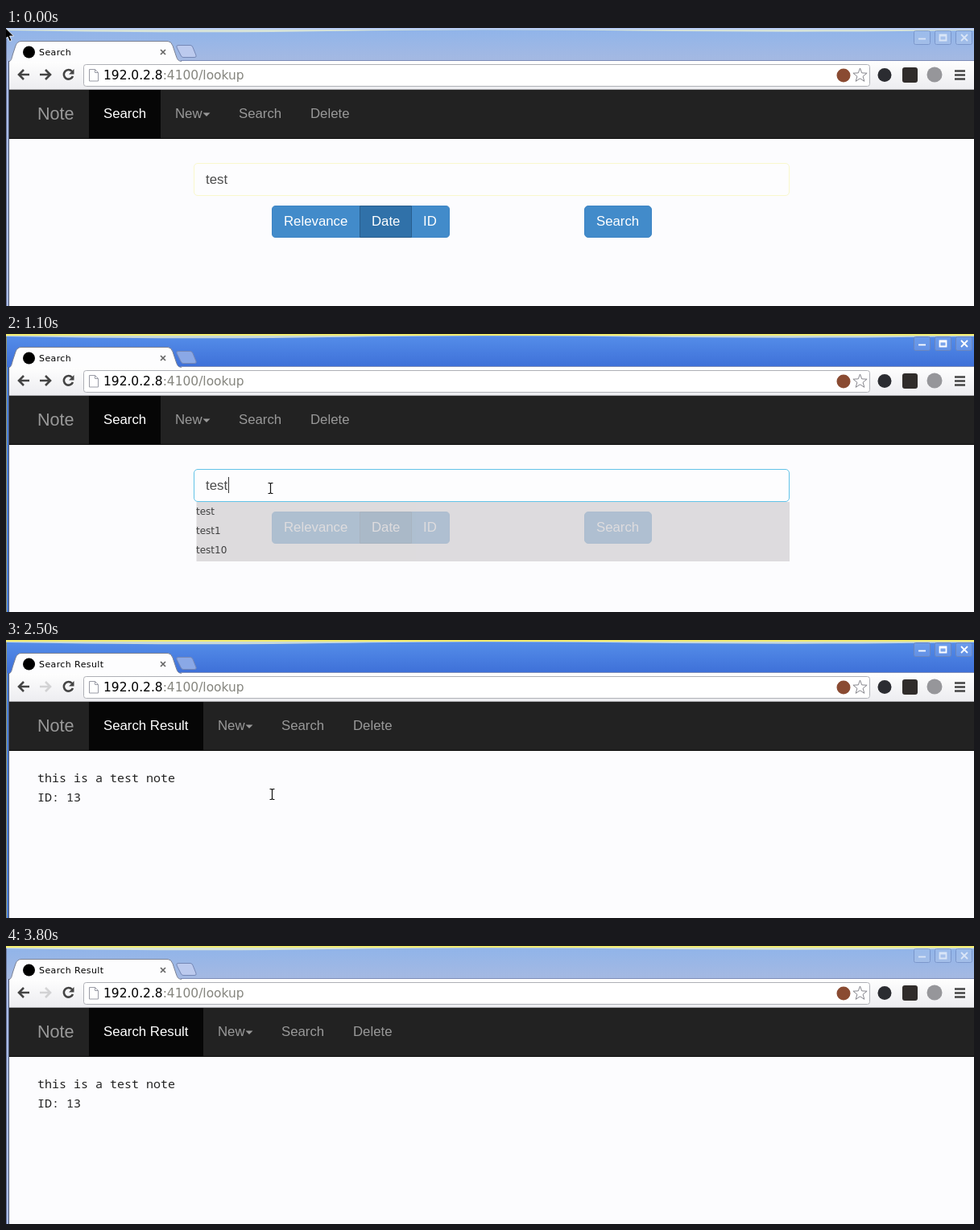
Animation of 1202 by 346 pixels, one loop 3900 ms. Source, as an HTML page:

```html
<!DOCTYPE html>
<html lang="en">
<head>
<meta charset="utf-8">
<title>Search</title>
<style>
html, body { margin: 0; width: 100%; height: 100%; overflow: hidden; background: #fcfcfe; }
svg { display: block; }
text { font: 16.8px "Liberation Sans", Arial, sans-serif; white-space: pre; }
.nav { fill: #999; }
.on { fill: #fff; }
.brand { font-size: 21.6px; }
.tab { font: 11px "DejaVu Sans", sans-serif; letter-spacing: .4px; }
.url { font: 15.45px "DejaVu Sans", sans-serif; }
.list text { font: 12px "DejaVu Sans", sans-serif; }
.note { font: 15px "Noto Sans Mono", monospace; fill: #222; }
.btn { fill: #428bca; stroke: #3d84c4; }
.down { fill: #3071a9; stroke: #285e8e; }
.icon { fill: none; stroke: #444; stroke-width: 2.6; }
</style>
</head>
<body>
<svg width="1202" height="346">
  <defs>
    <linearGradient id="idle" x2="0" y2="1">
      <stop offset="0" stop-color="#8fb4ea"/><stop offset="1" stop-color="#a5b9e2"/>
    </linearGradient>
    <linearGradient id="active" x2="0" y2="1">
      <stop offset="0" stop-color="#568fea"/><stop offset="1" stop-color="#3e70d8"/>
    </linearGradient>
    <linearGradient id="tool" x2="0" y2="1">
      <stop offset="0" stop-color="#fefefe"/><stop offset="1" stop-color="#ececf0"/>
    </linearGradient>
  </defs>

  <rect width="1202" height="346" fill="#fcfcfe"/>

  <!-- window frame -->
  <rect id="bar" width="1202" height="41"/>
  <rect id="side" y="41" width="3" height="305"/>
  <path d="M3.5 41V346" stroke="#4a5470"/>
  <path id="leftEdge" d="M.5 2V346"/>
  <path d="M0 0H1202V3Q1000 6 780 3.500T400 4T0 3Z" fill="#eef3d4" fill-opacity=".75"/>
  <path id="topEdge" d="M0 0H1202V2H0Z"/>
  <g id="winButtons" fill="#fff" fill-opacity=".14" stroke="#fff"></g>
  <path id="newTab" d="M214 21.500H229Q231 21.500 232 24L236 34Q237 36.500 234 36.500H220Q218 36.500 217 34L212 24Q211 21.500 214 21.500Z" stroke="#7587b5"/>
  <rect x="4" y="41" width="1198" height="36" fill="url(#tool)"/>
  <path d="M4 41.500C7 41 7 37 9 31L12 22Q14 16.500 19 16.500H201Q205 16.500 207 22L211 34C213 40 214 41 218 41.500" fill="#fdfdfe" stroke="#7c8294"/>
  <path d="M217 40.500H1202" stroke="#7d8cb8"/>
  <path d="M4 76.500H1202" stroke="#a9a9ad"/>
  <circle cx="28.500" cy="30" r="7.500"/>
  <text id="tabTitle" class="tab" x="41" y="34"></text>
  <path d="M192 27l6 6m0-6l-6 6" class="icon" style="stroke:#666;stroke-width:1.700"/>

  <!-- toolbar -->
  <path class="icon" d="M29 58H16M22 52l-6 6 6 6"/>
  <path id="forward" class="icon" d="M42 58H55M49 52l6 6-6 6"/>
  <path class="icon" d="M82 54A5.800 5.800 0 1 0 83 60"/>
  <path d="M84.500 51V57.500H78Z" fill="#444"/>
  <rect x="96.500" y="45.500" width="976" height="27" rx="3" fill="#fff" stroke="#aeb0b6"/>
  <path d="M103.500 51.500h7l4 4v10.500h-11zM110.500 51.500v4h4" fill="#fff" stroke="#9a9ca6"/>
  <text class="url" x="121" y="64">192.0.2.8<tspan fill="#85857e">:4100/lookup</tspan></text>
  <circle cx="1040" cy="59" r="8.500" fill="#8a4b32"/>
  <path id="star" fill="#fff" stroke="#85858c" stroke-linejoin="round"/>
  <circle cx="1091" cy="58.500" r="8.500" fill="#2b2c31"/>
  <rect x="1113" y="49" width="19" height="19" rx="3" fill="#302c2a"/>
  <circle cx="1153" cy="58" r="9.500" fill="#96969a"/>
  <path class="icon" d="M1178 53.500h13M1178 58.500h13M1178 63.500h13"/>

  <!-- navigation -->
  <rect x="4" y="77" width="1198" height="61" fill="#222"/>
  <path d="M4 137.500H1202" stroke="#080808"/>
  <rect id="navActive" x="103" y="77" height="60" fill="#060606"/>
  <text class="nav brand" x="39" y="114">Note</text>
  <text id="navTitle" class="on" x="121" y="112"></text>
  <g id="navLinks">
    <text class="nav" x="210" y="112">New</text>
    <path class="nav" d="M244.500 105.500h9l-4.500 4.500z"/>
    <text class="nav" x="289" y="112">Search</text>
    <text class="nav" x="378" y="112">Delete</text>
  </g>

  <!-- search page -->
  <g id="searchPage">
    <rect id="field" x="233.500" y="168.500" width="739" height="40" rx="4.500" fill="#fdfdfe"/>
    <text x="248" y="194" fill="#4c4c4c">test</text>
    <path id="caret" d="M276.500 178V198" stroke="#333"/>
    <path class="btn" d="M439.500 221.500H335Q330.500 221.500 330.500 226V256Q330.500 260.500 335 260.500H439.500Z"/>
    <path class="btn" d="M503.500 221.500H546Q550.500 221.500 550.500 226V256Q550.500 260.500 546 260.500H503.500Z"/>
    <path class="btn down" d="M439.500 221.500H503.500V260.500H439.500Z"/>
    <rect class="btn" x="718.500" y="221.500" width="83" height="39" rx="4.500"/>
    <g class="on">
      <text x="345" y="246">Relevance</text>
      <text x="454" y="246">Date</text>
      <text x="518" y="246">ID</text>
      <text x="733" y="246">Search</text>
    </g>
    <g id="list" class="list">
      <rect x="236.500" y="209" width="736.500" height="74" fill="#d3d1d3"/>
      <text x="236" y="225">test</text>
      <text x="236" y="249">test1</text>
      <text x="236" y="273">test10</text>
    </g>
  </g>

  <!-- result page -->
  <g id="resultPage">
    <text class="note" x="39" y="177">this is a test note</text>
    <text class="note" x="39" y="201">ID: 13</text>
  </g>

  <path id="arrow" d="M0 0V15L3.500 12 6 17.500 8.500 16.500 6 11H11Z" stroke="#fff" stroke-width=".8"/>
  <path id="beam" d="M-3 -6.500H-1L0 -5.500 1 -6.500H3M0 -5.500V5.500M-3 6.500H-1L0 5.500 1 6.500H3" fill="none" stroke="#111" stroke-width="1.200"/>
</svg>
<script>
const LOOP = 3900, STEP = 100;
const FOCUS = 800, RESULT = 2200, BLUR = 3700;
const $ = id => document.getElementById(id);
const set = (id, name, value) => $(id).setAttribute(name, value);
const show = (id, on) => set(id, 'visibility', on ? 'visible' : 'hidden');
const clamp = v => Math.min(1, Math.max(0, v));

// time, x, y of the pointer
const path = [
  [400, 334, 370], [600, 331, 232], [700, 330, 203], [900, 328, 192],
  [1200, 328, 192], [1400, 330, 192], [2700, 330, 192], [3200, 334, 370]
];

function pointerAt(t) {
  const i = path.findIndex(p => p[0] > t);
  if (i < 1) return null;
  const [t0, x0, y0] = path[i - 1], [t1, x1, y1] = path[i];
  const k = (t - t0) / (t1 - t0);
  return [x0 + (x1 - x0) * k, y0 + (y1 - y0) * k];
}

function buildIcons() {
  const glyphs = ['M1133 13.500h9', 'M1159.500 8.500h8v7h-8zM1159.500 9.500h8', 'M1186 8l8 8m0-8l-8 8'];
  $('winButtons').innerHTML = glyphs.map((d, i) =>
    `<rect x="${1127.5 + 26 * i}" y="3.5" width="20" height="17" rx="2" stroke="#6c86bd"/>` +
    `<path d="${d}" stroke-width="1.8"/>`).join('');
  const points = Array.from({ length: 10 }, (_, i) => {
    const r = i % 2 ? 3.8 : 9, a = (i * 36 - 90) * Math.PI / 180;
    return (1060.5 + r * Math.cos(a)).toFixed(1) + ' ' + (59 + r * Math.sin(a)).toFixed(1);
  });
  set('star', 'd', 'M' + points.join('L') + 'Z');
}

function draw(t) {
  const focused = t >= FOCUS && t < BLUR, result = t >= RESULT;
  const title = result ? 'Search Result' : 'Search';

  set('bar', 'fill', focused ? 'url(#active)' : 'url(#idle)');
  set('side', 'fill', focused ? '#4b80dc' : '#a9bbe8');
  set('leftEdge', 'stroke', focused ? '#8d9068' : '#6b769a');
  set('topEdge', 'fill', t < STEP ? '#b9cdf4' : '#f2ec72');
  set('newTab', 'fill', focused ? '#8aa8e6' : '#bccaee');
  set('winButtons', 'opacity', focused ? 1 : .65);
  set('forward', 'stroke-opacity', result ? .2 : 1);
  $('tabTitle').textContent = $('navTitle').textContent = title;
  set('navActive', 'width', result ? 142 : 89);
  set('navLinks', 'transform', `translate(${result ? 53 : 0})`);

  set('searchPage', 'display', result ? 'none' : 'inline');
  set('resultPage', 'display', result ? 'inline' : 'none');
  set('field', 'stroke', t >= FOCUS ? '#62c3e8' : '#f9f8cc');
  show('caret', t >= FOCUS && !result && (t - FOCUS) % 1000 < 500);
  set('list', 'opacity', clamp((t - FOCUS) / 400));

  const pos = t < STEP ? [-2, -1] : pointerAt(t);
  const inText = pos && pos[1] > 160 && pos[1] < 209;
  show('beam', inText);
  show('arrow', pos && !inText);
  if (pos) set(inText ? 'beam' : 'arrow', 'transform', `translate(${pos[0] + .5} ${pos[1]})`);
}

buildIcons();
const start = performance.now();
function tick() {
  const t = (performance.now() - start) % LOOP;
  draw(Math.floor(t / STEP) * STEP);
  requestAnimationFrame(tick);
}
tick();
</script>
</body>
</html>
```
